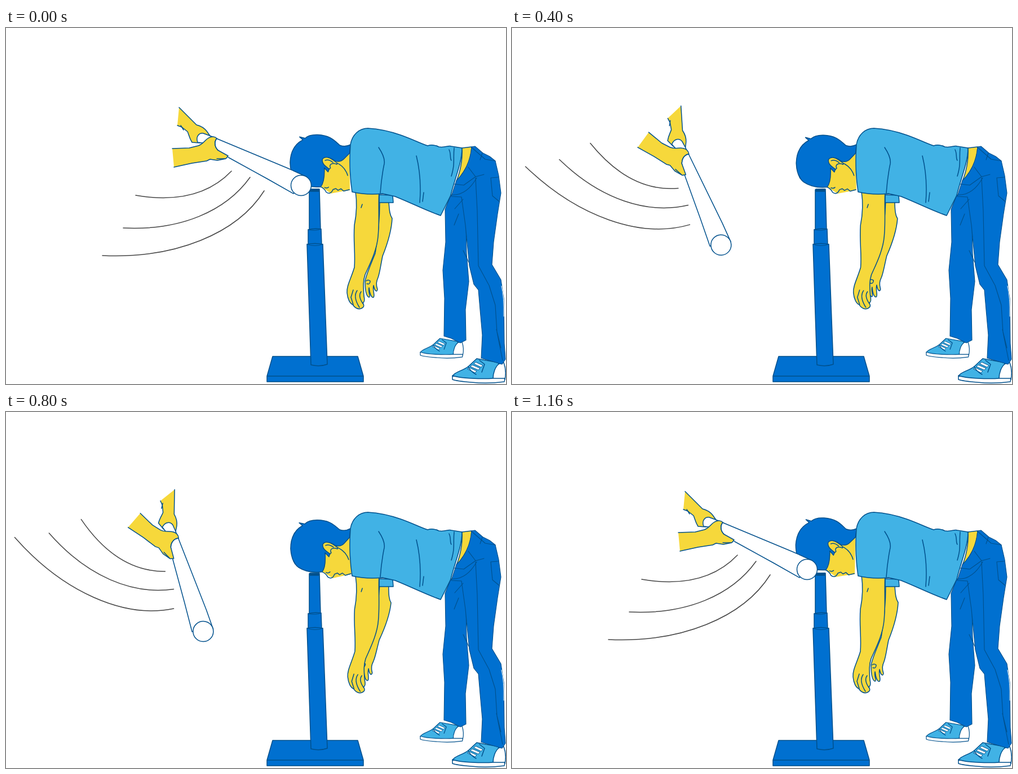
These frames come from a looping animation (887 by 632 pixels, 1200 ms). An HTML page:

```html
<!DOCTYPE html>
<html lang="en">
<head>
<meta charset="utf-8">
<title>Batting practice</title>
<style>
html, body { margin: 0; width: 100%; height: 100%; overflow: hidden; background: #fff; }
svg { display: block; width: 100%; height: 100%; stroke: #00508c; stroke-width: 1.5; stroke-linejoin: round; stroke-linecap: round; }
.skin { fill: #f6d83b; }
.blue { fill: #0070d0; }
.sky { fill: #41b2e5; }
.white { fill: #fff; }
.line { fill: none; }
.jeans { stroke-width: 1.1; }
.bare { stroke: none; }
.swish { fill: none; stroke: #444; }
</style>
</head>
<body>
<svg viewBox="0 0 887 632">
  <defs>
    <g id="shoe">
      <path class="sky" d="M0 31C4 23 18 22 28 14L43 0L82 7L78 36H20Z"/>
      <path class="white" d="M83 9L91 7C95 18 95 28 93 37L72 36C72 25 76 14 83 9Z"/>
      <path class="white" d="M0 30Q10 34 34 35T72 35L93 35L92 41Q62 45 34 42Q8 40 0 37Z"/>
      <path class="white" stroke-width="1" d="M32 14l3-3 14 6-3 3ZM38 9l3-3 13 6-3 3ZM27 18l3-2 13 6-3 3Z"/>
      <path class="line" d="M28 14Q32 23 42 28M48 3L57 10L52 24"/>
    </g>
  </defs>

  <!-- tee -->
  <g class="blue">
    <path d="M473 583H624L634 618H463ZM463 618H634V628H463Z"/>
    <path d="M538 287L556 286L558 358H538Z"/>
    <path d="M536 358Q547 355 559 357L560 385H536Z"/>
    <path d="M534 384Q548 381 562 384L570 597Q556 602 541 598Z"/>
    <path class="line" stroke-width="1" d="M534 384Q548 389 562 384M536 358Q548 361 559 357"/>
  </g>

  <!-- head -->
  <g id="head">
    <path class="skin bare" d="M560 235L609 212L613 288L602 290L580 295L562 284Z"/>
    <path class="line" d="M561 284C566 286 569 289 571 293C575 296 580 296 583 288L588 286L592 289L597 286L602 290L612 287M584 239C596 243 604 250 608 262M568 285Q572 287 575 284"/>
    <path class="blue" d="M611 207C604 211 598 211 592 209C583 202 575 192 552 192C541 192 534 195 530 199L520 197L526 202C510 211 505 226 505 243C506 258 511 270 519 276C530 283 545 286 561 284C567 276 567 262 566 250L573 257L575 251C568 247 562 243 562 236C568 229 578 232 584 237C591 239 597 237 601 232L610 222Z"/>
    <path class="skin" d="M575 252C566 246 561 242 562 235C566 229 574 231 580 235C586 239 590 241 588 243C581 240 573 243 577 250Z"/>
    <path class="line" d="M567 237Q573 234 581 240M510 264L513 270"/>
  </g>
  <path d="M539 286H555V290H539Z" fill="#00508c"/>

  <!-- arms and shirt -->
  <g id="farArm">
    <path class="skin" d="M663 307L679 307C680 325 681 332 685 338C684 360 676 385 668 405C664 425 663 435 660 443C657 450 656 455 659 464C658 470 654 467 652 457C650 467 655 474 652 478C648 480 645 470 644 461C642 470 648 477 644 478C638 476 637 460 637 450C638 440 645 425 655 400C660 370 663 340 663 307Z"/>
    <path class="line" d="M640 454Q646 456 646 449Q642 446 639 449"/>
  </g>
  <path class="sky" d="M662 296L686 297L687 310L662 310Z"/>
  <g id="nearArm">
    <path class="skin" d="M620 290C623 310 622 330 618 350C616 380 620 400 618 425C612 445 604 458 605 470C606 481 610 489 615 491C619 497 624 500 630 498C635 496 636 493 633 488C637 486 636 480 635 476C634 460 633 450 637 438C645 420 658 395 660 370C663 340 660 310 662 290Z"/>
    <path class="line" d="M616 465L612 478L616 491M623 466Q615 477 627 496M630 468Q624 476 633 489M632 313L630 319"/>
  </g>
  <path class="sky" d="M611 207C614 189 627 178 642 178C660 179 680 183 700 190C720 197 738 206 748 209C756 206 762 208 768 211C778 213 785 208 790 210L809 213C809 240 795 270 789 297L771 333C745 324 720 311 690 299L668 294Q640 297 614 291C610 265 609 235 611 207Z"/>
  <path class="line" d="M661 212Q673 230 671 241Q666 265 664 293M728 227C735 255 736 285 734 310M741 292L739 308M786 216C790 224 787 231 790 235M795 213C793 234 797 240 790 263"/>

  <!-- legs -->
  <use href="#shoe" transform="translate(735 551) scale(.81)"/>
  <use href="#shoe" transform="translate(792 587)"/>
  <path class="skin" d="M809 213L826 211C826 232 816 253 799 272C807 252 810 234 809 213Z"/>
  <g class="blue jeans">
    <path d="M789 297L779 322L780 380L775 430L778 480L777 547L790 551L806 559L816 554L815 500L821 450L817 400L815 290Z"/>
    <path d="M826 211L832 210L846 222L858 228L868 236L874 262L878 293L872 330L865 380L862 420L878 447L883 480L884 560L886 588L880 597L843 586L845 545L841 500L838 465L830 455L822 422L815 350L808 300L790 299L799 271C814 257 824 235 826 211Z"/>
    <path class="line" d="M845 222L841 234M820 247L833 264L848 260M795 277L812 279L833 264M789 296C808 298 823 287 835 266M833 266L836 325L838 422L857 457L868 492L871 540L881 590M860 266L873 265M860 266L863 298L875 308M796 321L811 304M795 350L803 330M811 395L821 416M870 535L878 568M826 212L850 233L868 236"/>
  </g>
  <path class="line" stroke="#fff" stroke-width="1" style="stroke:#fff" d="M879 458Q884 478 883 512"/>

  <!-- bat -->
  <g id="bat">
    <path class="swish" d="M230 297C300 309 358 298 400 254M208 355C310 360 390 325 433 265M171 404C300 410 410 365 458 289"/>
    <path class="skin" d="M307 141L338 172C346 174 352 178 356 183L363 193L344 204L330 203C325 195 324 188 322 184L312 176L304 173"/>
    <path class="line" d="M310 173L315 181"/>
    <path class="white" d="M340 203C336 192 343 186 350 187L361 191L500 249L533 264L510 294L464 268L395 230L358 205Z"/>
    <circle class="white" cx="523.5" cy="279.5" r="18"/>
    <path class="skin" d="M295 214L325 213L341 209C350 206 352 200 358 196C365 191 371 193 374 196C368 203 371 212 376 217L394 227L390 232L375 235L362 233L356 236L330 240L298 247"/>
    <path class="line" d="M374 196C368 203 371 212 376 217M374 232L388 232"/>
  </g>
</svg>
<script>
const LOOP = 1200, STEP = 40;
// each track: [ms, value], blended in a straight line
const swing = [[0, 0], [40, 18], [120, 55], [200, 73], [280, 30], [320, 0], [440, 62], [520, 35], [600, 0],
  [680, 50.8], [760, 62], [840, 30], [880, -.4], [1000, 42], [1120, 60], [1160, 0], [1200, 0]];
const jolt = [[0, 2.3], [120, .2], [280, .3], [320, 4.4], [440, .3], [520, .4], [560, .4], [600, 4.4],
  [680, 0], [840, .2], [880, 4.6], [1000, .4], [1120, .3], [1160, 3.8], [1200, 2.3]];
const sway = [[0, 0], [120, .33], [280, 1], [320, .2], [520, .83], [600, .15], [680, .5], [840, .9],
  [880, .15], [1120, .9], [1160, 0], [1200, 0]];

function at(track, t) {
  const i = track.findIndex(k => k[0] > t);
  const [t0, a] = track[i - 1], [t1, b] = track[i];
  return a + (b - a) * (t - t0) / (t1 - t0);
}

function turn(id, angle, x, y) {
  document.getElementById(id).setAttribute('transform', `rotate(${angle} ${x} ${y})`);
}

function draw(now) {
  const t = Math.floor(now % LOOP / STEP) * STEP;
  const s = at(sway, t);
  turn('bat', at(swing, t), 307, 130);
  turn('head', at(jolt, t), 612, 215);
  turn('farArm', 4.2 * s, 672, 305);
  turn('nearArm', -.5 * s, 640, 295);
}

let start;
function tick(now) {
  start ??= now;
  draw(now - start);
  requestAnimationFrame(tick);
}
draw(0);
requestAnimationFrame(tick);
</script>
</body>
</html>
```
